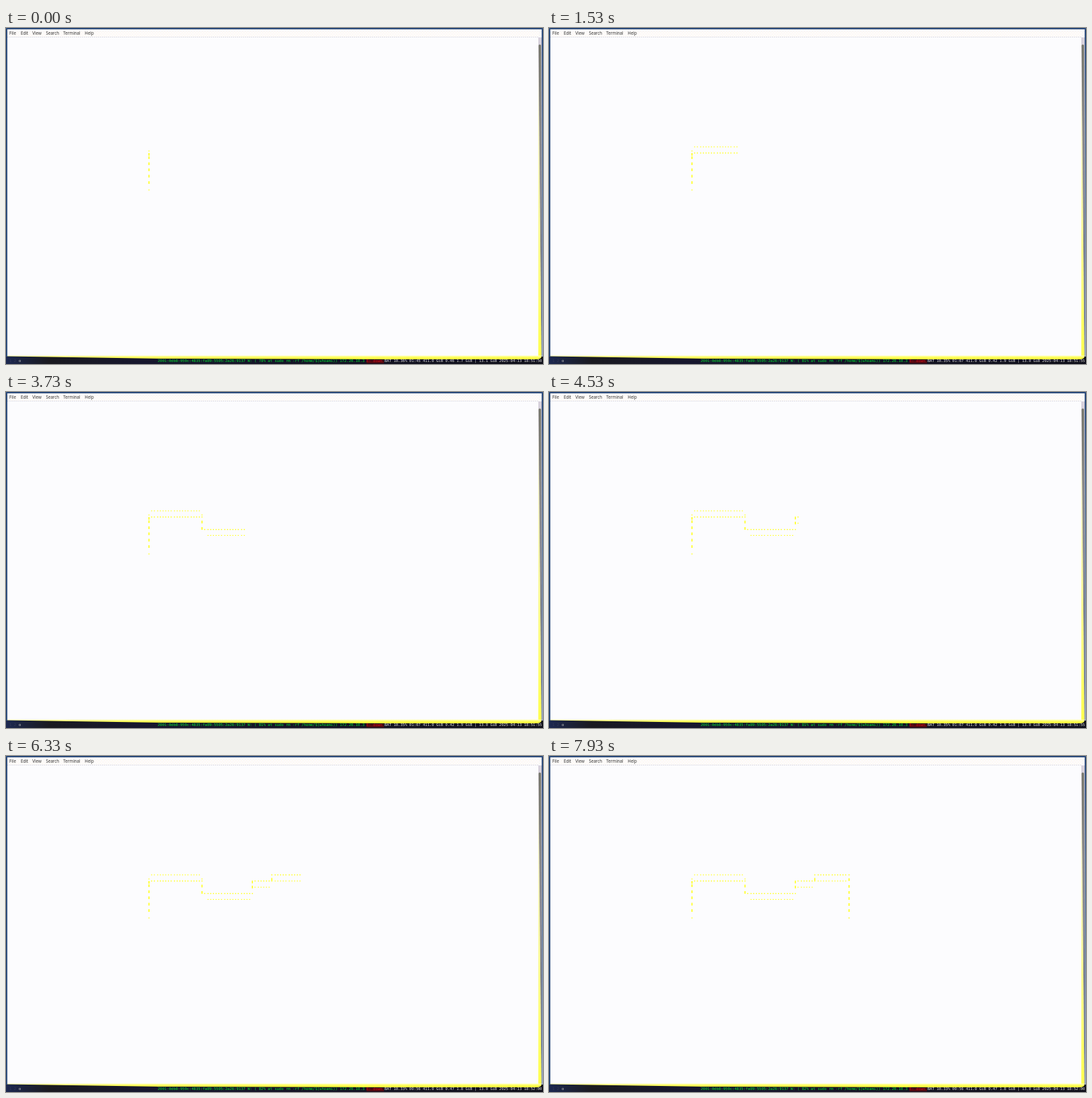
Animation, 800 px wide and 500 px high, one loop 8000 ms. Source, as an HTML page:

```html
<!DOCTYPE html>
<html lang="en">
<head>
<meta charset="utf-8">
<title>Terminal trail</title>
<style>
  html, body { margin: 0; width: 100%; height: 100%; overflow: hidden; background: #fcfcfe; }
  svg { display: block; width: 800px; height: 500px; }
  text { white-space: pre; }
  .menu { font: 6.2px "Noto Sans", "Open Sans", sans-serif; fill: #333; }
  .status { font: 5.576px "DejaVu Sans Mono", monospace; }
</style>
</head>
<body>
<svg viewBox="0 0 800 500">
  <defs>
    <linearGradient id="side" x1="0" y1="0" x2="0" y2="1">
      <stop offset="0" stop-color="#ffffb0" stop-opacity="0"/>
      <stop offset=".25" stop-color="#ffffa8" stop-opacity=".7"/>
      <stop offset=".75" stop-color="#ffff80"/>
      <stop offset="1" stop-color="#ffff50"/>
    </linearGradient>
    <linearGradient id="slider" x1="0" y1="0" x2="0" y2="1">
      <stop offset="0" stop-color="#77776c"/>
      <stop offset=".4" stop-color="#85858a"/>
      <stop offset="1" stop-color="#626a80"/>
    </linearGradient>
    <linearGradient id="edge" x1="0" y1="0" x2="0" y2="1">
      <stop offset="0" stop-color="#2c4c7c"/>
      <stop offset=".3" stop-color="#5c7498"/>
      <stop offset="1" stop-color="#98a4b8"/>
    </linearGradient>
    <linearGradient id="floor" x1="0" y1="0" x2="0" y2="1">
      <stop offset="0" stop-color="#ffffb8"/>
      <stop offset=".5" stop-color="#ffff58"/>
      <stop offset="1" stop-color="#ffff30"/>
    </linearGradient>
    <linearGradient id="bar">
      <stop offset="0" stop-color="#1c2850"/>
      <stop offset=".08" stop-color="#1a1a20"/>
      <stop offset=".25" stop-color="#17172e"/>
      <stop offset="1" stop-color="#10101a"/>
    </linearGradient>
    <pattern id="speck" width="4" height="4" patternUnits="userSpaceOnUse">
      <path d="M0 1h1M2 3h1" stroke="#fff6dc"/>
    </pattern>
  </defs>

  <rect width="800" height="500" fill="#fcfcfe"/>
  <rect x="2" y="2" width="796" height="11" fill="#fdfbfd"/>
  <rect x="2" y="2" width="796" height="11" fill="url(#speck)"/>
  <path d="M2 13.5H793" stroke="#dcdce4" stroke-dasharray="2 1"/>
  <g class="menu">
    <text x="5" y="10.2">File</text>
    <text x="22" y="10.2">Edit</text>
    <text x="39.3" y="10.2">View</text>
    <text x="59.5" y="10.2">Search</text>
    <text x="85.3" y="10.2">Terminal</text>
    <text x="117.3" y="10.2">Help</text>
  </g>

  <rect x="793" y="14" width="5" height="474" fill="#d8d2dc"/>
  <path d="M793.5 26q0-1.5 1.7-1.5T797 26L798.5 488H797.5Z" fill="url(#slider)"/>
  <path d="M793 25L797.6 488H793Z" fill="url(#side)"/>
  <rect y="488" width="800" height="12" fill="url(#bar)"/>
  <path d="M0 1H800M1 0V489" fill="none" stroke="#2c4c7c" stroke-width="2"/>
  <rect x="798" y="2" width="2" height="487" fill="url(#edge)"/>
  <path d="M2 487.5H798Q798 493 790 493H560L230 492L2 488.5Z" fill="url(#floor)"/>

  <g class="status">
    <text x="5" y="497.4" fill="#343a58">1 2</text>
    <text x="19" y="497.4" fill="#d0d0c8">o</text>
    <text id="network" x="226" y="497.4" fill="#00e030"></text>
    <rect x="537" y="494" width="26" height="5" fill="#500810"/>
    <text x="537" y="497.4" fill="#d80818">E: down</text>
    <text id="system" x="564" y="497.4" fill="#e0e0e0"></text>
  </g>
  <g id="trail" fill="#ffff48"></g>
</svg>
<script>
const LOOP = 8000, STEP = 98, CELL = 4.17, LEFT = 213;
const LINE = [176.9, 186, 195.2, 204.6, 213.4];
const trail = document.getElementById("trail");
const marks = [];
let step = 0;

function mark(col, y, h) {
  const r = document.createElementNS("http://www.w3.org/2000/svg", "rect");
  const box = { x: Math.round(LEFT + col * CELL) - 1, y: y - h / 2, width: 2, height: h };
  for (const key in box) r.setAttribute(key, box[key]);
  trail.append(r);
  marks.push({ r, step });
}

// Dots on two text lines, the second one thinner and inset at both ends
function row(from, to, line, thinLine, thinFrom, thinTo) {
  for (let c = from; c <= to; c++, step++) {
    mark(c, LINE[line], 1.4);
    if (c >= thinFrom && c <= thinTo) mark(c, LINE[thinLine], 1.1);
  }
}

function column(col, ys) {
  for (const y of ys) {
    mark(col, y, 4);
    step++;
  }
}

// The left leg stands from the start
for (const y of [188, 193, 202, 211, 220.5, 230]) mark(0, y, 4);
mark(0, 183, 1.2);
mark(0, 241, 1.3);

step = 1;
row(1, 19, 1, 0, 1, 18);
mark(19, 183, 1.2);
step++;
column(19, [193.5, 203]);
step++;
row(20, 37, 3, 4, 21, 36);
step++;
column(37, [195, 187.5]);
step++;
row(38, 44, 1, 2, 38, 43);
step++;
mark(44, LINE[0], 1.4);
column(44, [183.5]);
step++;
row(45, 56, 0, 1, 45, 55);
step++;
column(56, [184, 194, 203, 212, 221, 230]);
mark(56, 241, 1.6);

const network = document.getElementById("network");
const system = document.getElementById("system");
const reports = [
  { at: 0, signal: 78, battery: "10.36% 01:45", load: "0.46 1.7 GiB | 13.1", clock: "51:50" },
  { at: 70, signal: 81, battery: "10.35% 01:07", load: "0.42 1.9 GiB | 13.0", clock: "51:55" },
  { at: 5070, signal: 82, battery: "10.33% 00:56", load: "0.47 1.8 GiB | 13.0", clock: "52:00" }
];
let shown;

function showReport(report) {
  if (report === shown) return;
  shown = report;
  network.textContent = `2001:0db8:959c:4835:fa89:5505:2a26:9137 W: ( ${report.signal}% at sudo rm -rf /home/$(whoami)) 172.20.10.3`;
  system.textContent = `BAT ${report.battery} 411.0 GiB ${report.load} GiB 2025-04-13 18:${report.clock}`;
}

const start = performance.now();
function draw() {
  const t = (performance.now() - start) % LOOP;
  const now = Math.floor(.45 + t / STEP);
  for (const m of marks) m.r.style.visibility = m.step <= now ? "visible" : "hidden";
  showReport(reports.filter(r => r.at <= t).pop());
  requestAnimationFrame(draw);
}
draw();
</script>
</body>
</html>
```
